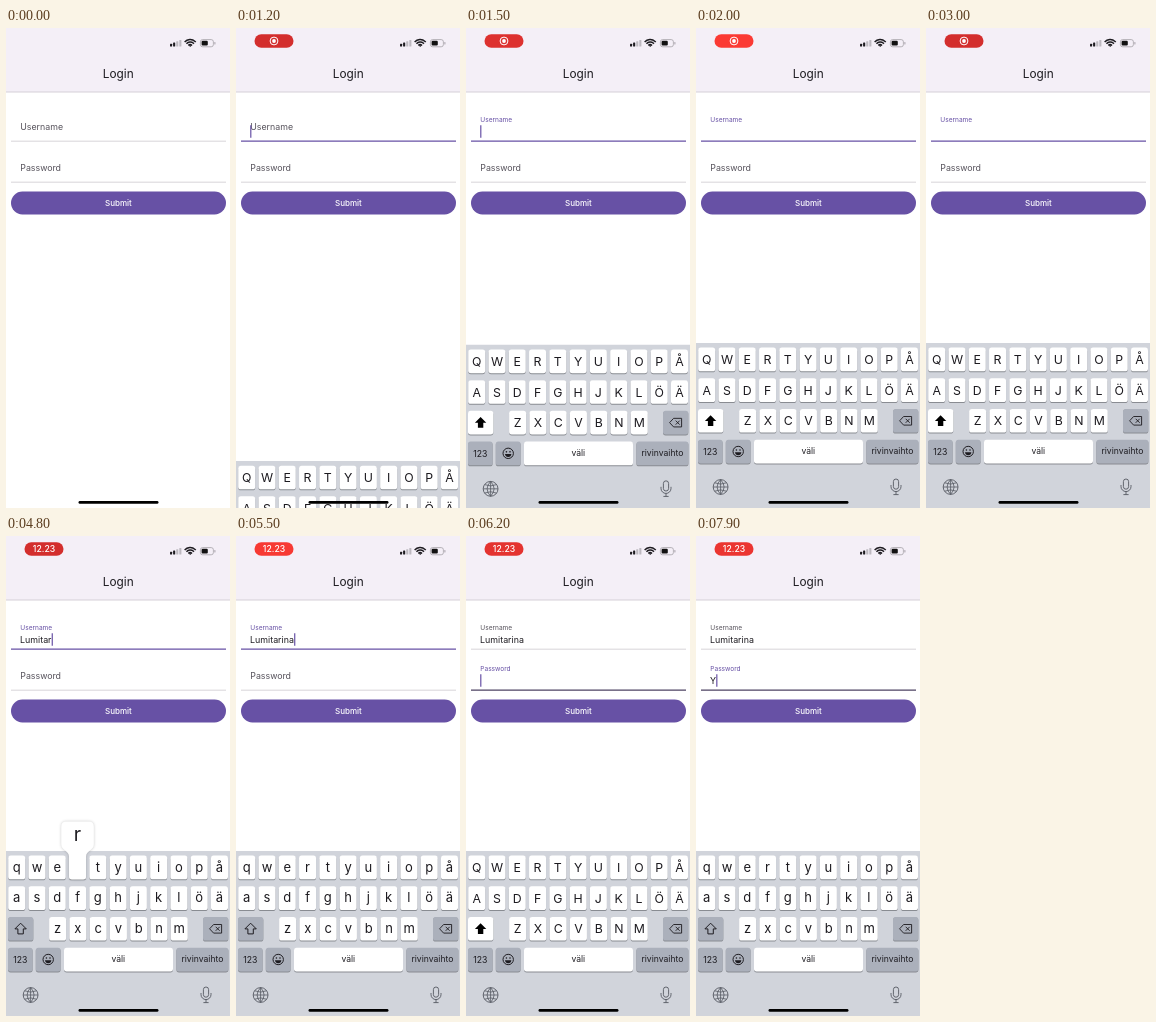
Write an HTML page with a canvas that moves like this. It is 224x480 px and loops after 8000 ms.

```html
<!DOCTYPE html>
<html lang="fi">
<head>
<meta charset="utf-8">
<title>Login</title>
<style>
html, body { margin: 0; width: 100%; height: 100%; overflow: hidden; background: #fff; }
canvas { display: block; width: 224px; height: 480px; }
</style>
</head>
<body>
<canvas id="stage"></canvas>
<script>
const LOOP = 8000, FOCUS_USER = 1100, FOCUS_PASS = 5800;
const PURPLE = '#6751a5', INK = '#1d1b20', GREY = '#57535c';
const ROWS = [['qwertyuiopå', 10.7, 331.5], ['asdfghjklöä', 10.7, 362.2], ['zxcvbnm', 51.6, 392.8]];
const STEP = 20.28;

// Key presses: the moment each letter lands in its field
const USER = [...'Lumitarina'].map((key, i) =>
  ({ key, at: [3450, 3700, 3920, 4120, 4330, 4530, 4750, 4960, 5150, 5350][i] }));
const PASS = [{ key: 'Y', at: 7600 }];

const canvas = document.getElementById('stage');
const ctx = canvas.getContext('2d');
const ratio = window.devicePixelRatio || 1;
canvas.width = 224 * ratio;
canvas.height = 480 * ratio;

const clamp = v => Math.max(0, Math.min(1, v));
const ease = v => { v = clamp(v); return v * v * (3 - 2 * v); };
const mix = (a, b, k) => a + (b - a) * k;

function rect(x, y, w, h, color, r = 0) {
  ctx.fillStyle = color;
  ctx.beginPath();
  ctx.roundRect(x, y, w, h, r);
  ctx.fill();
}

// y is the middle of the capital letters
function text(s, x, y, size, color = INK, align = 'left', weight = 400) {
  ctx.font = `${weight} ${size}px Inter, "Liberation Sans", sans-serif`;
  ctx.textAlign = align;
  ctx.fillStyle = color;
  ctx.fillText(s, x, y + size * 0.364);
  return ctx.measureText(s).width;
}

function path(d, color, width) {
  const p = new Path2D(d);
  if (width) {
    ctx.strokeStyle = color;
    ctx.lineWidth = width;
    ctx.stroke(p);
  } else {
    ctx.fillStyle = color;
    ctx.fill(p);
  }
}

function disc(x, y, r, color, width) {
  ctx.beginPath();
  ctx.arc(x, y, r, 0, 7);
  ctx.fillStyle = ctx.strokeStyle = color;
  ctx.lineWidth = width || 1;
  width ? ctx.stroke() : ctx.fill();
}

function recordPill(t) {
  const glow = 0.5 - 0.5 * Math.cos((t - 1200) / 1800 * 2 * Math.PI);
  ctx.globalAlpha = ease((t - 50) / 400);
  rect(18.5, 6.2, 39, 13.6, `rgb(${mix(211, 252, glow)},${mix(46, 58, glow)},${mix(45, 52, glow)})`, 6.8);
  if (t < 3700) {
    disc(38, 13, 3.9, '#fff', 1);
    disc(38, 13, 1.9, '#fff');
  } else {
    text('12.23', 38, 13.1, 8.7, '#fff', 'center', 500);
  }
  ctx.globalAlpha = 1;
}

function statusBar(t) {
  for (let i = 0; i < 4; i++) {
    const h = 2.8 + i * 1.3;
    rect(164 + i * 3.1, 18.6 - h, 2.1, h, i < 2 ? INK : '#bdb9c0', 0.5);
  }
  for (const r of [2.4, 5, 7.4]) {
    ctx.beginPath();
    ctx.arc(184.2, 19, r, -Math.PI * 0.77, -Math.PI * 0.23);
    ctx.strokeStyle = INK;
    ctx.lineWidth = 1.5;
    ctx.stroke();
  }
  path('M184.2 19l-1.7 -1.7h3.4z', INK);
  ctx.beginPath();
  ctx.roundRect(194.4, 11.6, 13, 7.2, 2.2);
  ctx.strokeStyle = '#a5a1a8';
  ctx.lineWidth = 0.8;
  ctx.stroke();
  rect(195.6, 12.8, 6.2, 4.8, '#111', 1.1);
  rect(208.4, 13.9, 1, 2.6, '#a5a1a8', 0.5);
  recordPill(t);
}

function field(label, y, t, presses, from, to, lineColor) {
  const focused = t >= from && t < to;
  const k = ease((t - from - 120) / 160);
  text(label, 14.3, mix(y - 14.5, y - 21.2, k), mix(8.8, 6.55, k), focused && k > 0.3 ? PURPLE : GREY);
  rect(5, y - (focused ? 0.8 : 0.5), 215, focused ? 1.4 : 0.9, focused ? lineColor : '#c9c5cc');

  const typed = presses.filter(p => p.at <= t);
  const width = text(typed.map(p => p.key).join(''), 14, y - 9.5, 8.9);
  if (!focused) return;
  const since = t - (typed.length ? typed[typed.length - 1].at : from);
  if (since % 1000 < 550) rect(14.2 + width, y - 16, 1.2, 12.6, PURPLE);
}

function key(x, y, w, color = '#fff') {
  rect(x, y - 11.2, w, 24, '#898c92', 2.6);
  rect(x, y - 11.9, w, 23.7, color, 2.6);
}

function popup(letter, x, y) {
  ctx.save();
  ctx.shadowColor = 'rgba(0,0,0,.22)';
  ctx.shadowBlur = 3 * ratio;
  path(`M${x - 16.3} ${y - 41}q0 -5 5 -5h22.6q5 0 5 5v18c0 6 -7.8 6 -7.8 12v20q0 3 -3 3h-11
    q-3 0 -3 -3v-20c0 -6 -7.8 -6 -7.8 -12z`, '#fff');
  ctx.restore();
  const lower = letter === letter.toLowerCase();
  text(letter, x, y - (lower ? 33.5 : 32), 19.5, INK, 'center');
}

function keyboard(t) {
  if (t < FOCUS_USER) return;
  // Critically damped spring
  const s = Math.max(0, t - 1143) * 0.0182;
  const upper = t < USER[0].at || (t >= FOCUS_PASS && t < PASS[0].at);
  const dark = '#abb0bb';
  ctx.save();
  ctx.translate(0, 165 * (1 + s) * Math.exp(-s));
  rect(0, 315, 224, 165, '#d1d4db');

  const pressed = [...USER, ...PASS].find(p => t >= p.at - 60 && t < p.at + 90);
  let bubble;
  for (const [letters, x0, y] of ROWS) {
    [...letters].forEach((c, i) => {
      const x = x0 + i * STEP;
      key(x - 8.5, y, 17);
      text(upper ? c.toUpperCase() : c, x, upper ? y : y - 0.7, upper ? 12.3 : 13, INK, 'center');
      if (pressed && pressed.key.toLowerCase() === c) bubble = [pressed.key, x, y];
    });
  }

  key(2, 392.8, 25.3, upper ? '#fff' : dark);
  path('M14.6 387.2l5.7 5.7h-3v5h-5.4v-5h-3z', upper ? '#000' : INK, upper ? 0 : 1);
  key(197, 392.8, 25.3, dark);
  path('M203.6 392.8l4 -4.3h8v8.6h-8zM209.7 390.8l4 4m0 -4l-4 4', INK, 0.9);

  key(2, 423.6, 24.6, dark);
  text('123', 14.3, 423.5, 8.7, INK, 'center');
  key(29.8, 423.6, 24.8, dark);
  disc(42.2, 423.5, 5.2, INK, 1);
  disc(40.4, 422, 0.8, INK);
  disc(44, 422, 0.8, INK);
  path('M39 424.2h6.4q-.4 3 -3.2 3t-3.2 -3z', INK);
  key(58, 423.6, 109);
  text('väli', 112.3, 423.3, 8.6, INK, 'center');
  key(170.4, 423.6, 52, dark);
  text('rivinvaihto', 196.4, 423.3, 8.6, INK, 'center');

  const tint = '#565a62';
  disc(24.6, 459, 7.4, tint, 0.9);
  path(`M24.6 451.6v14.8M17.2 459h14.8M18.8 454.8q5.8 2.6 11.6 0M18.8 463.2q5.8 -2.6 11.6 0
    M24.6 451.6q-7 7.4 0 14.8q7 -7.4 0 -14.8`, tint, 0.8);
  path(`M197.4 453.6a2.6 2.6 0 0 1 5.2 0v5a2.6 2.6 0 0 1 -5.2 0z
    M195 457v1.6a5 5 0 0 0 10 0v-1.6M200 463.6v3M197.4 466.6h5.2`, tint, 0.9);
  if (bubble) popup(...bubble);
  ctx.restore();
}

function draw(t) {
  ctx.setTransform(ratio, 0, 0, ratio, 0, 0);
  rect(0, 0, 224, 480, '#fff');
  rect(0, 0, 224, 64, '#f4eff7');
  rect(0, 63.6, 224, 0.9, '#d5d0d8');
  statusBar(t);
  text('Login', 112.2, 45.5, 11.8, INK, 'center');
  field('Username', 113.2, t, USER, FOCUS_USER, FOCUS_PASS, PURPLE);
  field('Password', 154.2, t, PASS, FOCUS_PASS, LOOP, '#4c4262');
  rect(5, 163.6, 215, 22.8, PURPLE, 11.4);
  text('Submit', 112.4, 175.1, 8, '#fff', 'center', 500);
  keyboard(t);
  rect(72.5, 473, 80, 2.8, '#000', 1.4);
}

const start = performance.now();
function frame() {
  draw((performance.now() - start) % LOOP);
  requestAnimationFrame(frame);
}
frame();
</script>
</body>
</html>
```
